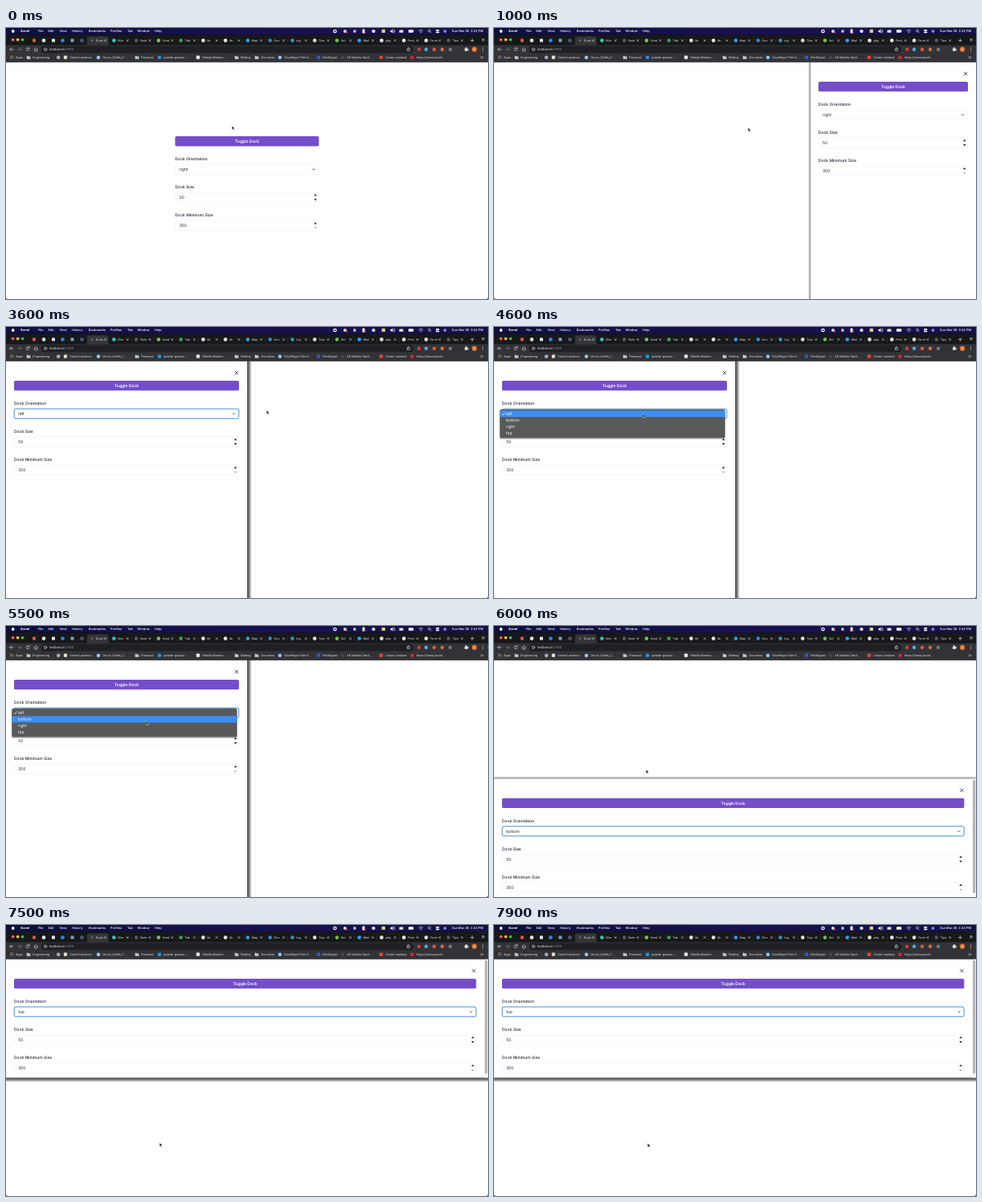
An HTML page that plays this animation: 600x338 px, repeating every 8000 ms.

```html
<!DOCTYPE html>
<html lang="en">
<head>
<meta charset="utf-8">
<title>Dock demo</title>
<style>
  html, body { margin: 0; width: 100%; height: 100%; overflow: hidden; background: #000; }
  #stage { display: block; width: 100vw; height: 100vh; }
  text { font-family: Inter, "Open Sans", sans-serif; text-rendering: geometricPrecision; white-space: pre; }
  .ui { font-size: 3.7px; fill: #e4e5e8; }
  .menu { font-size: 3.9px; fill: #fff; font-weight: 500; }
  .label { font-size: 5px; font-weight: 500; fill: #1a202c; }
  .value { font-size: 5px; fill: #1a202c; }
  .caption { font-size: 5px; font-weight: 600; fill: #fff; text-anchor: middle; }
  .field { fill: #fff; stroke: #e2e8f0; stroke-width: .4; }
  .field.focus { stroke: #3182ce; stroke-width: .9; }
  .line { fill: none; stroke: #e8e9eb; stroke-width: .6; stroke-linecap: round; }
  .option { font-size: 5px; fill: #fff; }
</style>
</head>
<body>
<svg id="stage" viewBox="0 0 600 338" preserveAspectRatio="none">
  <defs>
    <linearGradient id="sky">
      <stop offset="0" stop-color="#0c1040"/>
      <stop offset=".5" stop-color="#191150"/>
      <stop offset="1" stop-color="#141148"/>
    </linearGradient>
    <filter id="blur" filterUnits="userSpaceOnUse" x="-20" y="-20" width="640" height="340">
      <feGaussianBlur stdDeviation="1.2"/>
    </filter>
  </defs>

  <g id="header"></g>

  <svg id="page" x="0" y="42.5" width="600" height="295.5">
    <path d="M0 0H600V293.5Q600 295.5 598 295.5H2Q0 295.5 0 293.5Z" fill="#fff"/>
    <rect id="shade" fill="#000" fill-opacity=".6" filter="url(#blur)"/>
    <svg id="dock">
      <rect width="600" height="296" fill="#fff"/>
      <g id="bar">
        <rect x="-4.7" width="4.7" height="296" fill="#f7f7f7"/>
        <rect id="thumb" x="-3.9" y="1.2" width="3.1" rx="1.5" fill="#b4b4b6"/>
      </g>
      <path id="close" d="M-2.2 -2.2L2.2 2.2M2.2 -2.2L-2.2 2.2" stroke="#1a202c" stroke-width=".75"/>
    </svg>
    <svg id="clip"><g id="form"></g></svg>
  </svg>

  <g id="popup">
    <rect id="popShade" y="1" height="36" rx="2" fill="#000" fill-opacity=".35"/>
    <rect id="popBack" height="35.4" rx="1.6" fill="#58595b"/>
    <rect id="glow" height="8.2" fill="#3b8df0"/>
    <path id="check" d="M3 .3L4 1.5L5.9 -1.6" fill="none" stroke="#fff" stroke-width=".7"/>
    <g id="options"></g>
  </g>

  <path id="cursor" d="M0 0V4.6L1.1 3.7L1.9 5.4L2.8 5L2 3.4H3.4Z" fill="#000" stroke="#fff" stroke-width=".45"/>
</svg>

<script>
const LOOP = 8000, W = 600, H = 295.5, TOP = 42.5, ROW = 8.2;
const $ = id => document.getElementById(id);
const set = (el, attrs) => { for (const k in attrs) el.setAttribute(k, attrs[k]); };
const move = (el, x, y) => el.setAttribute('transform', `translate(${x} ${y})`);
const show = (el, on) => el.setAttribute('visibility', on ? 'visible' : 'hidden');

const text = (x, y, s, cls, extra = '') => `<text x="${x}" y="${y}" class="${cls}" ${extra}>${s}</text>`;
const rect = (x, y, w, h, fill, rx = 0) => `<rect x="${x}" y="${y}" width="${w}" height="${h}" rx="${rx}" fill="${fill}"/>`;
const dot = (x, y, r, fill) => `<circle cx="${x}" cy="${y}" r="${r}" fill="${fill}"/>`;
const line = (d, extra = '') => `<path class="line" d="${d}" ${extra}/>`;
const cross = (x, y, r) => line(`M${x - r} ${y - r}l${2 * r} ${2 * r}m0 ${-2 * r}l${-2 * r} ${2 * r}`, 'stroke-width=".45"');
const folder = x => `<path d="M${x - 2.3} 34.8h1.8l.7.7h2.3v3.2h-4.8z" fill="#c3c6ca"/>`;

function menuBar() {
  const items = [[40, 'File'], [52.5, 'Edit'], [66.5, 'View'], [82, 'History'], [103, 'Bookmarks'],
    [130, 'Profiles'], [151, 'Tab'], [163.5, 'Window'], [185, 'Help']];
  return rect(0, 0, W, 8.6, 'url(#sky)') + dot(8.7, 4, 1.9, '#f4f4f8') +
    text(18, 5.4, 'Sorrel', 'menu', 'style="font-weight:700"') +
    items.map(([x, s]) => text(x, 5.4, s, 'menu')).join('') +
    dot(409.5, 4, 2.3, '#fff') + rect(408.6, 3.1, 1.8, 1.8, '#191150', .3) +
    dot(422, 4, 2, '#d7d7e4') + dot(424, 5.4, 1.1, '#e2504a') +
    dot(434, 4, 1.9, '#b9bacb') +
    rect(443.6, 1.6, 3, 4.8, '#fff', .5) + dot(446.8, 5.4, 1, '#e2504a') +
    dot(457.5, 4, 2.1, '#fff') + rect(467.6, 1.8, 4.4, 4.2, '#d5cf8a', .8) +
    '<path d="M478.5 3h1.2l1.6-1.4v4.8l-1.6-1.4h-1.2z" fill="#fff"/>' +
    line('M482.3 2.6q1 1.4 0 2.8M483.5 1.9q1.6 2.1 0 4.2', 'stroke-width=".5"') +
    rect(489.5, 2.4, 5, 3.4, '#e6e6f0', .5) +
    rect(501, 2.2, 6, 3.6, '#fff', .9) + rect(507.3, 3.4, .5, 1.2, '#fff') +
    line('M513.8 3.1q2.6-2.4 5.2 0M514.9 4.3q1.5-1.3 3 0', 'stroke-width=".7"') + dot(516.4, 5.6, .6, '#fff') +
    '<circle cx="526.8" cy="3.5" r="1.5" class="line"/>' + line('M528 4.7l1.3 1.3') +
    rect(535, 1.9, 4.4, 1.8, '#fff', .9) + rect(535, 4.4, 4.4, 1.8, '#fff', .9) +
    dot(546.5, 4, 2.1, '#8b5bc4') + dot(546.2, 4.2, 1, '#57c2e0') +
    text(594, 5.4, '', 'menu', 'id="clock" text-anchor="end"');
}

function tabStrip() {
  const pinned = [[35, '#d95a4e'], [47, '#eee'], [59, '#dfe9f5'], [70.5, '#2d88ff'], [82.5, '#7ea2bd'], [94.5, '#4b5a75']];
  const names = ['Mor', 'Note', 'Gard', 'Tab', 'lib', 'lib', 'Map', 'Doc', 'log', 'Tips', 'Set', 'Mail', 'pkg', 'Find', 'Form', 'Tips'];
  const tints = ['#38c5bb', '#55585d', '#7cc256', '#3f9e63', '#f2f2f2', '#f2f2f2', '#3b9be0', '#2f86d6',
    '#3d8fc4', '#e9e9e9', '#6cc04a', '#2aa3ef', '#f5f5f5', '#f2f2f2', '#f2f2f2', '#55585d'];
  let out = rect(0, 8.5, W, 13, '#17181a');
  ['#ff5f57', '#febc2e', '#28c840'].forEach((c, i) => out += dot(8.6 + 6 * i, 14.6, 1.9, c));
  pinned.forEach(([x, c], i) => out += i % 2 ? dot(x, 15.6, 2.3, c) : rect(x - 2, 13.6, 4, 4, c, .4));
  out += '<path d="M99 21.5q2 0 2-2v-6.500q0-2.500 2.500-2.500h21.500q2.500 0 2.500 2.500v6.500q0 2 2 2z" fill="#35363a"/>' +
    dot(107, 15.6, 1.3, '#686b70') + text(111.8, 16.9, 'Dock', 'ui') + cross(123.6, 15.6, 1.1);
  names.forEach((s, i) => {
    const x = 134.4 + 27.76 * i;
    out += dot(x, 15.6, 2.3, tints[i]) + text(x + 4.9, 16.9, s, 'ui') + cross(x + 16.8, 15.6, 1);
    if (i) out += rect(x - 5.9, 13, .3, 5.500, '#4b4d50');
  });
  return out + line('M578.300 15.600h4M580.300 13.600v4') + dot(594, 14.8, 2, '#6a6c70');
}

function toolBar() {
  const badges = [[514, '#e0353a'], [523, '#5aa9e0'], [533, '#e8553b'], [543, '#e06a35'], [553, '#77797d']];
  return rect(0, 21.300, W, 21.2, '#323337') +
    line('M9 26.700h-4.200m1.900-1.900l-1.900 1.900l1.900 1.900') +
    line('M14.800 26.700h4.200m-1.900-1.900l1.900 1.900l-1.900 1.900', 'style="stroke:#85878b"') +
    line('M28.800 25.700a2 2 0 1 0 .2 1.600M29 24.300v1.500h-1.500') +
    line('M34.900 26.700l2.200-2l2.200 2M35.600 26.500v2.300h3v-2.300') +
    rect(43.5, 22.4, 464, 8.800, '#1f2023', 4.4) +
    '<circle cx="49" cy="26.700" r="1.7" class="line" stroke-width=".4"/>' + rect(48.8, 26.300, .4, 1.4, '#e4e5e8') +
    text(54, 28.200, 'testbench<tspan fill="#9aa0a6">:7310</tspan>', 'ui', 'style="font-size:4.2px"') +
    line('M501 24.600l.7 1.400l1.500.2l-1.100 1l.3 1.500l-1.400-.7l-1.400.7l.3-1.500l-1.100-1l1.500-.2z', 'stroke-width=".4"') +
    badges.map(([x, c], i) => i % 2 ? dot(x, 26.700, 2.2, c) : rect(x - 2, 24.700, 4, 4, c, 1)).join('') +
    rect(571, 25.300, 3.700, 3.500, '#e8e9eb', .5) + dot(572.800, 25, .9, '#e8e9eb') + dot(574.900, 27, .9, '#e8e9eb') +
    dot(583, 26.700, 3.100, '#e8762c') + text(583, 28, 'C', 'ui', 'text-anchor="middle"') +
    [25, 26.700, 28.4].map(y => dot(593.5, y, .5, '#e8e9eb')).join('');
}

function bookmarks() {
  // A missing tint means a folder icon.
  const items = [[28, 'Engineering'], [74, 'Velvet Lanterns', '#e5dcd2'], [115, 'Grove_Drafts_T...', '#9fc3ea'],
    [163, 'Personal'], [191, 'palette-guides-...', '#2d8fdc'], [239, 'HillsAndHarbor...', '#f2f2f2'],
    [287, 'Betting'], [312, 'Groceries'], [341, 'SlowPaper Film K...', '#8fc4ef'], [389, 'MintSignal', '#3155d8'],
    [419, '4K Marble Gard...', '#44464a'], [467, 'Cedar Lowland', '#e2472f'], [505.5, 'https://www.plumf...', '#d8262c']];
  let out = '';
  for (let i = 0; i < 9; i++)
    out += rect(5 + i % 3 * 1.5, 34.6 + Math.floor(i / 3) * 1.5, 1, 1, ['#e85b4e', '#f0b33c', '#58a55c', '#4f8df0'][i % 4]);
  out += text(12, 38, 'Apps', 'ui') + dot(65.2, 36.700, 2.2, '#aeb2b7');
  items.forEach(([x, s, tint], i) => {
    out += !tint ? folder(x) : i % 2 ? rect(x - 2.1, 34.600, 4.2, 4.2, tint, .7) : dot(x, 36.700, 2.3, tint);
    out += text(x + 5.300, 38, s, 'ui');
  });
  return out + line('M590.800 35.400l1.300 1.300l-1.300 1.300m2-2.600l1.300 1.300l-1.300 1.300', 'stroke-width=".45"');
}

function formParts() {
  const arrow = (y, dir, fill) => `<path d="M-1.800 ${y}h3.600l-1.800 ${dir * 2.2}z" fill="${fill}"/>`;
  const stepper = (y, low) => `<g class="end" data-gap="4.3">${arrow(y - 1.900, -1, '#1a202c')}${arrow(y + 2, 1, low)}</g>`;
  const field = y => `<rect class="field wide" x=".2" y="${y}" height="12.1" rx="1.9"/>`;
  return '<rect class="wide" height="12.400" rx="1.900" fill="#744ec9"/>' +
    text(0, 8, 'Toggle Dock', 'caption', 'id="caption"') +
    text(0, 30.300, 'Dock Orientation', 'label') + field(35.2) + text(5.2, 43.100, '', 'value', 'id="choice"') +
    '<g class="end" data-gap="6.5"><path d="M-1.500 40.600L0 42.100L1.500 40.600" fill="none" stroke="#1a202c" stroke-width=".75"/></g>' +
    text(0, 65.300, 'Dock Size', 'label') + field(70.2) + text(5.2, 78.100, '50', 'value') + stepper(76.2, '#1a202c') +
    text(0, 100.400, 'Dock Minimum Size', 'label') + field(105.3) + text(5.2, 113.200, '350', 'value') + stepper(111.3, '#a6abb3');
}

const CHOICES = ['left', 'bottom', 'right', 'top'];
$('header').innerHTML = menuBar() + tabStrip() + toolBar() + bookmarks();
$('form').innerHTML = formParts();
$('options').innerHTML = CHOICES.map((s, i) => text(7.6, 7 + ROW * i, s, 'option')).join('');
const wide = [...document.querySelectorAll('.wide')];
const ends = [...document.querySelectorAll('.end')];
const select = document.querySelector('.field');

// Time, side, final width and height of the dock.
const DOCKS = [[880, 'right', W / 2, H], [2950, 'left', W / 2, H], [5650, 'bottom', W, H / 2], [7500, 'top', W, H / 2]];
const MENUS = [[1850, 2950], [4250, 5650], [6850, 7500]];
const PATH = [[0, 281.3, 122], [300, 286, 127], [650, 298, 139.5], [880, 299, 139.5], [1000, 316.3, 124.3],
  [1350, 334, 111], [1800, 331, 107], [2500, 328.7, 107.4], [2800, 324, 92], [3050, 323, 92.5], [3600, 324.4, 103.8],
  [4150, 205, 107.5], [4700, 183, 108.5], [5500, 174.2, 118.3], [5700, 175, 118], [6250, 200, 225],
  [6700, 212.7, 258], [6900, 210, 258], [7200, 197, 263], [7450, 191.2, 271.5], [7900, 191.2, 272.3], [8000, 191.2, 272.3]];

const mix = (a, b, p) => a + (b - a) * p;

// cubic-bezier(.25, .1, .25, 1)
function ease(x) {
  if (x >= 1) return 1;
  let lo = 0, hi = 1;
  const at = (a, b, s) => 3 * a * s * (1 - s) ** 2 + 3 * b * s * s * (1 - s) + s ** 3;
  for (let i = 0; i < 20; i++) {
    const mid = (lo + hi) / 2;
    if (at(.25, .25, mid) < x) lo = mid; else hi = mid;
  }
  return at(.1, 1, lo);
}

function pointer(t) {
  const i = Math.max(1, PATH.findIndex(p => p[0] > t));
  const [t0, x0, y0] = PATH[i - 1], [t1, x1, y1] = PATH[i];
  const p = (t - t0) / (t1 - t0), s = p * p * (3 - 2 * p);
  return [mix(x0, x1, s), mix(y0, y1, s)];
}

function dockAt(t) {
  const i = DOCKS.filter(d => d[0] <= t).length - 1;
  if (i < 0) return null;
  const [start, side, w1, h1] = DOCKS[i];
  const [, , w0, h0] = i ? DOCKS[i - 1] : [0, '', 0, H];
  const p = ease((t - start) / 300), w = mix(w0, w1, p), h = mix(h0, h1, p);
  return { side, w, h, x: side === 'right' ? W - w : 0, y: side === 'bottom' ? H - h : 0 };
}

function drawForm(x, y, width, choice, focus) {
  move($('form'), x, y);
  wide.forEach(el => el.setAttribute('width', Math.max(0, width - (el.classList.contains('field') ? .4 : 0))));
  ends.forEach(el => move(el, width - el.dataset.gap, 0));
  $('caption').setAttribute('x', width / 2);
  $('choice').textContent = choice;
  select.classList.toggle('focus', focus);
}

function drawPopup(x, y, width, chosen, py) {
  const top = y - 5.35 - ROW * chosen;
  const hover = Math.floor((py - top - 1.25) / ROW);
  const row = hover < 0 || hover > 3 ? chosen : hover;
  move($('popup'), x, top);
  set($('popBack'), { width });
  set($('popShade'), { width: width + 1, x: -.5 });
  set($('glow'), { width, y: 1.25 + ROW * row });
  move($('check'), 0, 5.35 + ROW * chosen);
}

function draw(t) {
  const [px, py] = pointer(t), dock = dockAt(t);
  const choice = dock ? dock.side : 'right';
  move($('cursor'), px, py);
  $('clock').textContent = `Sun Mar 28  2:${t < 7500 ? 42 : 43} PM`;
  show($('dock'), dock);
  show($('shade'), dock);

  let left = 210.5, top = 92.5, width = 179;
  if (dock) {
    const { x, y, w, h } = dock, scroll = h < 152, inner = w - (scroll ? 4.7 : 0);
    const box = { x, y, width: w, height: h };
    set($('dock'), box);
    set($('clip'), box);
    set($('shade'), { x: x - 1, y: y - 1, width: w + 5, height: h + 5 });
    $('bar').setAttribute('display', scroll ? 'inline' : 'none');
    move($('bar'), w, 0);
    $('thumb').setAttribute('height', Math.max(0, h - 6));
    move($('close'), inner - 13, 14.6);
    left = 10; top = 24.4; width = Math.max(0, inner - 20);
  } else {
    set($('clip'), { x: 0, y: 0, width: W, height: H });
  }
  drawForm(left, top, width, choice, t >= MENUS[0][0]);

  const open = MENUS.some(([a, b]) => t >= a && t < b);
  show($('popup'), open);
  if (open) drawPopup(dock.x + left - 2.6, TOP + dock.y + top + 41.300, width, CHOICES.indexOf(choice), py);
}

const start = performance.now();
function tick() {
  draw((performance.now() - start) % LOOP);
  requestAnimationFrame(tick);
}
tick();
</script>
</body>
</html>
```
